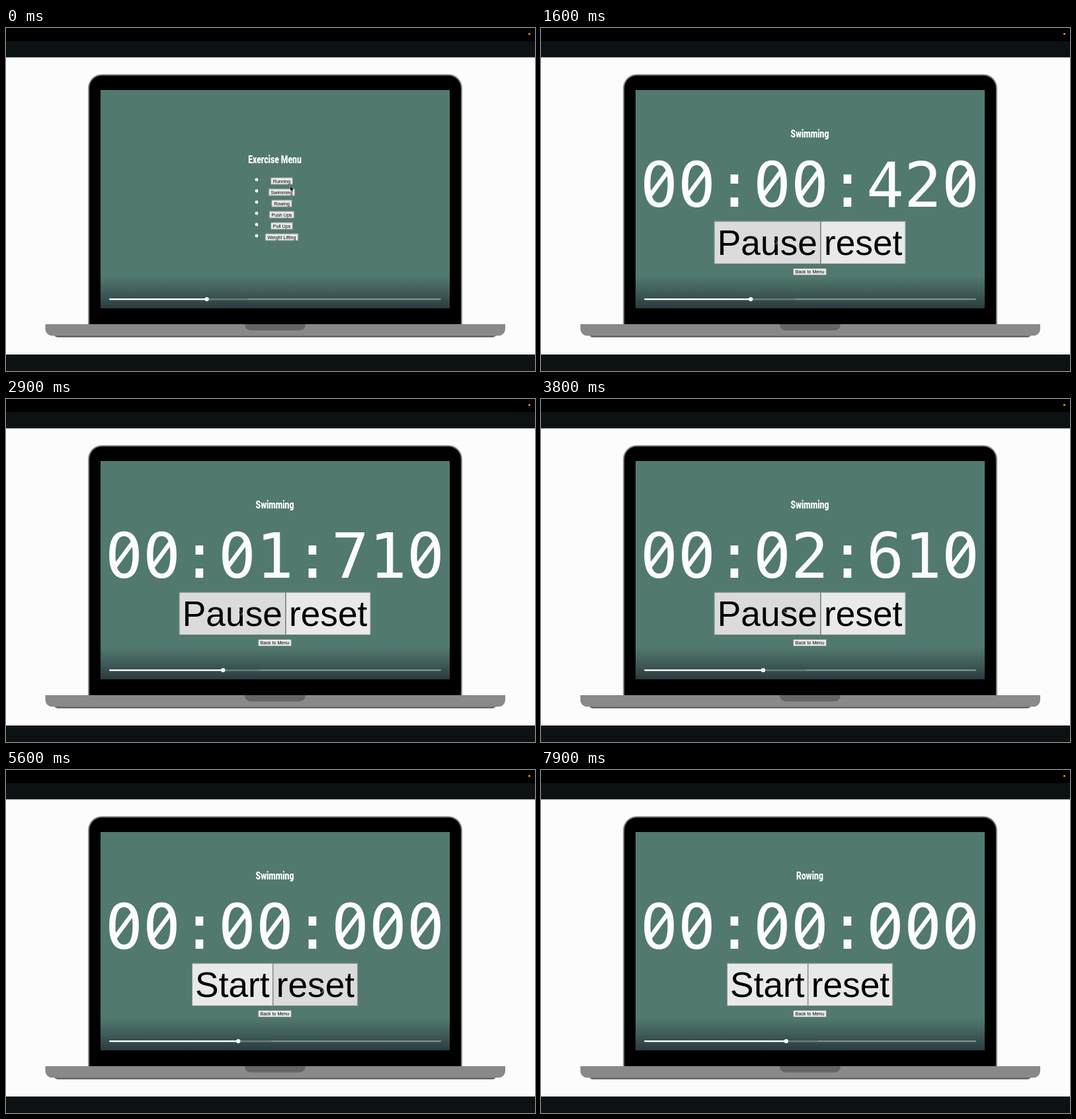
These frames come from a looping animation (800 by 520 pixels, 8000 ms). An HTML page with a canvas:

```html
<!DOCTYPE html>
<html lang="en">
<head>
<meta charset="utf-8">
<title>Exercise stopwatch</title>
<style>
  html, body { margin: 0; width: 100%; height: 100%; overflow: hidden; background: #fcfcfc; }
  canvas { display: block; }
</style>
</head>
<body>
<canvas id="stage" width="800" height="520"></canvas>
<script>
const ctx = document.getElementById('stage').getContext('2d');
const LOOP = 8000, STEP = 100;
const SANS = '"Liberation Sans", Arial, sans-serif';
const MONO = '"DejaVu Sans Mono", Menlo, monospace';
const TEAL = '#51796f';
const EXERCISES = ['Running', 'Swimming', 'Rowing', 'Push Ups', 'Pull Ups', 'Weight Lifting'];

// Moments of the clicks, in ms
const OPEN = 600, START = 1182, PAUSE = 4100, RESET = 5200, BACK = 6500, NEXT = 7700;

// Pointer path: time, x, y
const PATH = [
  [0, 430, 240], [400, 421, 247], [700, 421, 247], [1100, 353, 320], [3000, 353, 320],
  [3700, 368, 317], [4400, 368, 317], [5000, 475, 330], [5700, 475, 330],
  [6200, 408, 368], [6600, 408, 368], [7100, 416, 235], [7500, 420, 264], [7900, 421, 267]
];

function rect(x, y, w, h, color) {
  ctx.fillStyle = color;
  ctx.fillRect(x, y, w, h);
}

function round(x, y, w, h, radii, color) {
  ctx.fillStyle = color;
  ctx.beginPath();
  ctx.roundRect(x, y, w, h, radii);
  ctx.fill();
}

function oval(x, y, rx, ry, color) {
  ctx.fillStyle = color;
  ctx.beginPath();
  ctx.ellipse(x, y, rx, ry, 0, 0, Math.PI * 2);
  ctx.fill();
}

function text(str, x, y, font, color) {
  ctx.font = font;
  ctx.fillStyle = color;
  ctx.textAlign = 'center';
  ctx.fillText(str, x, y);
}

// Heavy condensed heading face
function heading(str, x, y) {
  ctx.save();
  ctx.translate(x, y);
  ctx.scale(0.76, 1);
  text(str, 0, 0, '900 16px Roboto, "Open Sans", sans-serif', '#fff');
  ctx.restore();
}

function buttonWidth(label, size, pad) {
  ctx.font = `${size}px ${SANS}`;
  return ctx.measureText(label).width + pad * 2;
}

function button(label, cx, cy, size, pad, h, mouse) {
  const w = buttonWidth(label, size, pad), x = cx - w / 2, y = cy - h / 2;
  const hover = mouse.x > x && mouse.x < x + w && mouse.y > y && mouse.y < y + h;
  rect(x, y, w, h, hover ? '#dbdbdb' : '#e9e9e9');
  ctx.strokeStyle = '#5c6a66';
  ctx.lineWidth = 0.7;
  ctx.strokeRect(x + 0.35, y + 0.35, w - 0.7, h - 0.7);
  text(label, cx, cy + size * 0.36, `${size}px ${SANS}`, '#000');
}

function pointerAt(t) {
  const i = PATH.findIndex(p => p[0] > t);
  if (i < 0) return { x: PATH.at(-1)[1], y: PATH.at(-1)[2] };
  const [t0, x0, y0] = PATH[i - 1], [t1, x1, y1] = PATH[i];
  const u = (t - t0) / (t1 - t0), k = u * u * (3 - 2 * u);
  return { x: x0 + (x1 - x0) * k, y: y0 + (y1 - y0) * k };
}

function arrow({ x, y }) {
  ctx.save();
  ctx.translate(x, y);
  ctx.beginPath();
  [[0, 0], [0, 7], [1.6, 5.6], [2.7, 8], [3.8, 7.5], [2.8, 5.2], [5, 5]]
    .forEach(p => ctx.lineTo(...p));
  ctx.closePath();
  ctx.strokeStyle = 'rgba(255,255,255,.75)';
  ctx.lineWidth = 1;
  ctx.stroke();
  ctx.fillStyle = '#000';
  ctx.fill();
  ctx.restore();
}

function beam({ x, y }) {
  for (const [color, width] of [['#ddd', 2], ['#222', 0.8]]) {
    ctx.strokeStyle = color;
    ctx.lineWidth = width;
    ctx.beginPath();
    ctx.moveTo(x - 1.5, y - 4);
    ctx.lineTo(x, y - 3);
    ctx.lineTo(x + 1.5, y - 4);
    ctx.moveTo(x, y - 3);
    ctx.lineTo(x, y + 3);
    ctx.moveTo(x - 1.5, y + 4);
    ctx.lineTo(x, y + 3);
    ctx.lineTo(x + 1.5, y + 4);
    ctx.stroke();
  }
}

function laptop() {
  rect(0, 0, 800, 520, '#fcfcfc');
  rect(0, 0, 800, 20, '#000');
  rect(0, 20, 800, 24.5, '#0c1114');
  rect(0, 495, 800, 25, '#0c1114');
  oval(791.5, 9, 1.6, 1.6, '#f59a0b');
  round(124, 70, 566, 385, [21, 21, 0, 0], '#888');
  round(126, 72, 562, 383, [19, 19, 0, 0], '#000');
  round(73, 460, 668, 9, [0, 0, 5, 5], '#666');
  round(59.5, 449, 695.5, 17.5, [0, 0, 10, 10], '#898989');
  round(361, 449, 92, 9.5, [0, 0, 9, 9], '#656565');
  rect(143, 94, 528, 331, TEAL);
}

function menu(mouse) {
  heading('Exercise Menu', 406.5, 205);
  EXERCISES.forEach((name, i) => {
    oval(379, 230 + i * 17, 2.4, 2.4, '#fff');
    button(name, 417, 232 + i * 17, 7.11, 3.7, 10.8, mouse);
  });
}

function digit(ch, x) {
  text(ch, x, 270.7, `94.7px ${MONO}`, '#fcfdfc');
  if (ch !== '0') return;
  // swap the dotted centre for a slash
  oval(x, 236, 9.5, 17, TEAL);
  ctx.strokeStyle = '#fcfdfc';
  ctx.lineWidth = 6.5;
  ctx.beginPath();
  ctx.moveTo(x - 14, 254.5);
  ctx.lineTo(x + 14, 216.5);
  ctx.stroke();
}

function stopwatch(name, ms, running, mouse) {
  heading(name, 406.5, 166);
  const pad = (n, len) => String(n).padStart(len, '0');
  const clock = `${pad(Math.floor(ms / 60000), 2)}:${pad(Math.floor(ms / 1000) % 60, 2)}:${pad(ms % 1000, 3)}`;
  [...clock].forEach((ch, i) => digit(ch, 178.5 + i * 57));

  const main = running ? 'Pause' : 'Start';
  const w1 = buttonWidth(main, 53.3, 5), w2 = buttonWidth('reset', 53.3, 5);
  const left = 406.6 - (w1 + w2) / 2;
  button(main, left + w1 / 2, 325.3, 53.3, 5, 65, mouse);
  button('reset', left + w1 + w2 / 2, 325.3, 53.3, 5, 65, mouse);
  button('Back to Menu', 406.5, 369.5, 7.11, 3.7, 10.8, mouse);
}

function scrubber(t) {
  const shade = ctx.createLinearGradient(0, 376, 0, 425);
  shade.addColorStop(0, 'rgba(35,45,52,0)');
  shade.addColorStop(0.5, 'rgba(35,45,52,.38)');
  shade.addColorStop(1, 'rgba(35,45,52,.82)');
  rect(143, 376, 528, 49, shade);
  const head = 303.6 + t * 0.00851;
  const loaded = 366 + 17.6 * [800, 3300, 5900].filter(s => t >= s).length;
  round(156, 410, 502, 2.2, 1.1, '#829290');
  rect(head, 410, loaded - head, 2.2, '#687d7c');
  round(156, 410, head - 156, 2.2, 1.1, '#fff');
  oval(head, 411.1, 3.2, 3.2, '#fff');
}

function draw(t) {
  const mouse = pointerAt(t);
  const inMenu = t < OPEN || (t >= BACK && t < NEXT);
  laptop();
  if (inMenu) {
    menu(mouse);
  } else {
    const elapsed = Math.max(0, Math.min(t, PAUSE) - START) * 0.9965;
    const ms = t < RESET ? Math.round(elapsed / 10) * 10 : 0;
    stopwatch(t < BACK ? 'Swimming' : 'Rowing', ms, t >= START && t < PAUSE, mouse);
  }
  scrubber(t);
  const overDigits = !inMenu && mouse.y > 190 && mouse.y < 290;
  (overDigits ? beam : arrow)(mouse);
}

const begin = performance.now();
function tick() {
  const t = (performance.now() - begin) % LOOP;
  draw(Math.floor(t / STEP) * STEP);
  requestAnimationFrame(tick);
}
tick();
</script>
</body>
</html>
```
